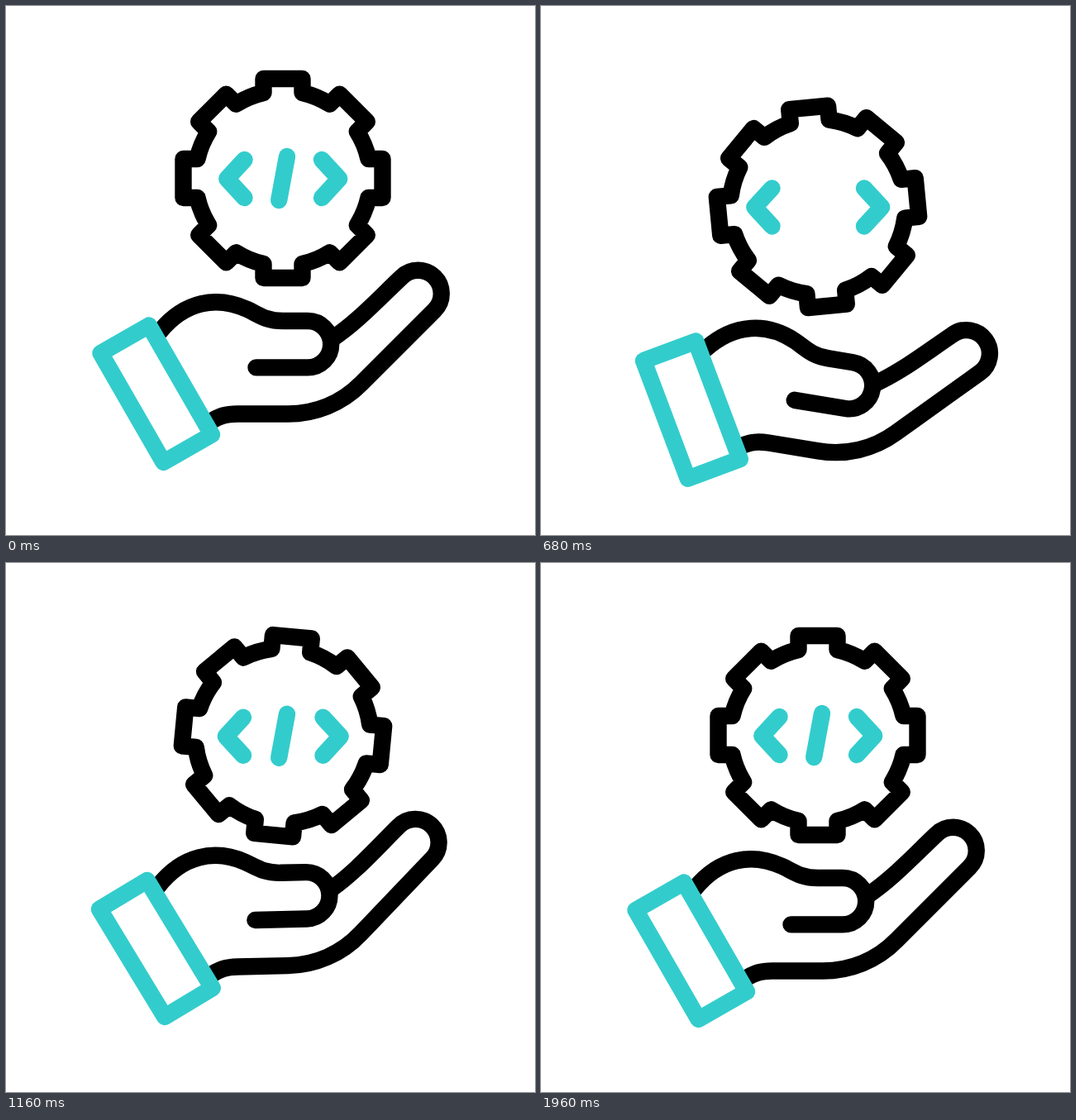
Recreate the animation shown at these times as an HTML page. Size 640 by 640 pixels, loop 2 s.

```html
<!DOCTYPE html>
<html lang="en">
<head>
<meta charset="utf-8">
<title>Gear in hand</title>
<style>
  html, body { margin: 0; width: 100%; height: 100%; overflow: hidden; background: #fff; }
  svg { display: block; width: 100vw; height: 100vh; }
  path { fill: none; stroke: #000; stroke-width: 20.4; stroke-linecap: round; stroke-linejoin: round; }
  .teal { stroke: #33cccc; }
</style>
</head>
<body>
<svg viewBox="0 0 640 640">
  <g id="badge">
    <path id="gear"/>
    <path id="left" class="teal" d="M288.5 186 L267.3 209 L288.5 232"/>
    <path id="slash" class="teal" d="M340 182 L330.2 235"/>
    <path id="right" class="teal" d="M382 186 L403.2 209 L382 232"/>
  </g>
  <g id="hand">
    <path d="M186 394 C216 357 255 350 292 367 C305 373 314 381 335 381 H365 A28.2 28.2 0 0 1 365 437.4 H302.5"/>
    <path d="M394 403 C424 383 447 358 478.6 328 A28.2 28.2 0 0 1 518.5 368 L430 456.5 C406 481 374 493.5 341 493.5 H280 C266 493.5 258 496 247 503"/>
    <path class="teal" d="M114.5 420 L173 386.5 L249 518.5 L190.5 552 Z"/>
  </g>
</svg>
<script>
const LOOP = 2000, STEP = 40;
const CX = 335, CY = 208.5;
const $ = id => document.getElementById(id);

// Eight teeth joined by arcs
function gearPath() {
  const half = 23.5, outer = -120.5, inner = -103.5, r = Math.hypot(half, inner);
  let d = '';
  for (let i = 0; i < 8; i++) {
    const a = i * Math.PI / 4, c = Math.cos(a), s = Math.sin(a);
    const at = (x, y) => `${(CX + x * c - y * s).toFixed(2)} ${(CY + x * s + y * c).toFixed(2)}`;
    d += (i ? `A${r} ${r} 0 0 1 ` : 'M') + at(-half, inner);
    d += `L${at(-half, outer)}L${at(half, outer)}L${at(half, inner)}`;
  }
  return d + `A${r} ${r} 0 0 1 ${CX - half} ${CY + inner}Z`;
}

// Cubic ease with handles (a, 0) and (b, 1)
const ease = (a, b) => x => {
  let lo = 0, hi = 1;
  for (let i = 0; i < 30; i++) {
    const s = (lo + hi) / 2, q = 1 - s;
    if (3 * a * s * q * q + 3 * b * s * s * q + s * s * s < x) lo = s; else hi = s;
  }
  return lo * lo * (3 - 2 * lo);
};
const smooth = ease(.55, .45), soft = ease(.45, .55), rise = ease(.55, .56);

// Keys are [ms, value, ease towards this key]
function track(keys, t) {
  if (t <= keys[0][0]) return keys[0][1];
  for (let i = 1; i < keys.length; i++) {
    const [t0, v0] = keys[i - 1], [t1, v1, e = smooth] = keys[i];
    if (t < t1) return v0 + (v1 - v0) * e((t - t0) / (t1 - t0));
  }
  return keys[keys.length - 1][1];
}

const tilt = [[80, 0], [640, 9.4, rise], [1300, -2.3, soft], [1920, 0]];
const drop = [[80, 0], [720, 34.7, rise], [1400, -8.5], [1930, 0]];
const spin = [[80, 0], [1760, 180]];
const spread = [[240, 0], [800, 9.6], [1320, 0]];

function draw() {
  const t = Math.floor(performance.now() % LOOP / STEP) * STEP;
  const gap = track(spread, t);
  $('hand').setAttribute('transform', `rotate(${track(tilt, t)} 63 483)`);
  $('badge').setAttribute('transform', `translate(0 ${track(drop, t)})`);
  $('gear').setAttribute('transform', `rotate(${track(spin, t)} ${CX} ${CY})`);
  $('left').setAttribute('transform', `translate(${-gap} 0)`);
  $('right').setAttribute('transform', `translate(${gap} 0)`);
  $('slash').setAttribute('visibility', t >= 640 && t < 1160 ? 'hidden' : 'visible');
  requestAnimationFrame(draw);
}

$('gear').setAttribute('d', gearPath());
draw();
</script>
</body>
</html>
```
